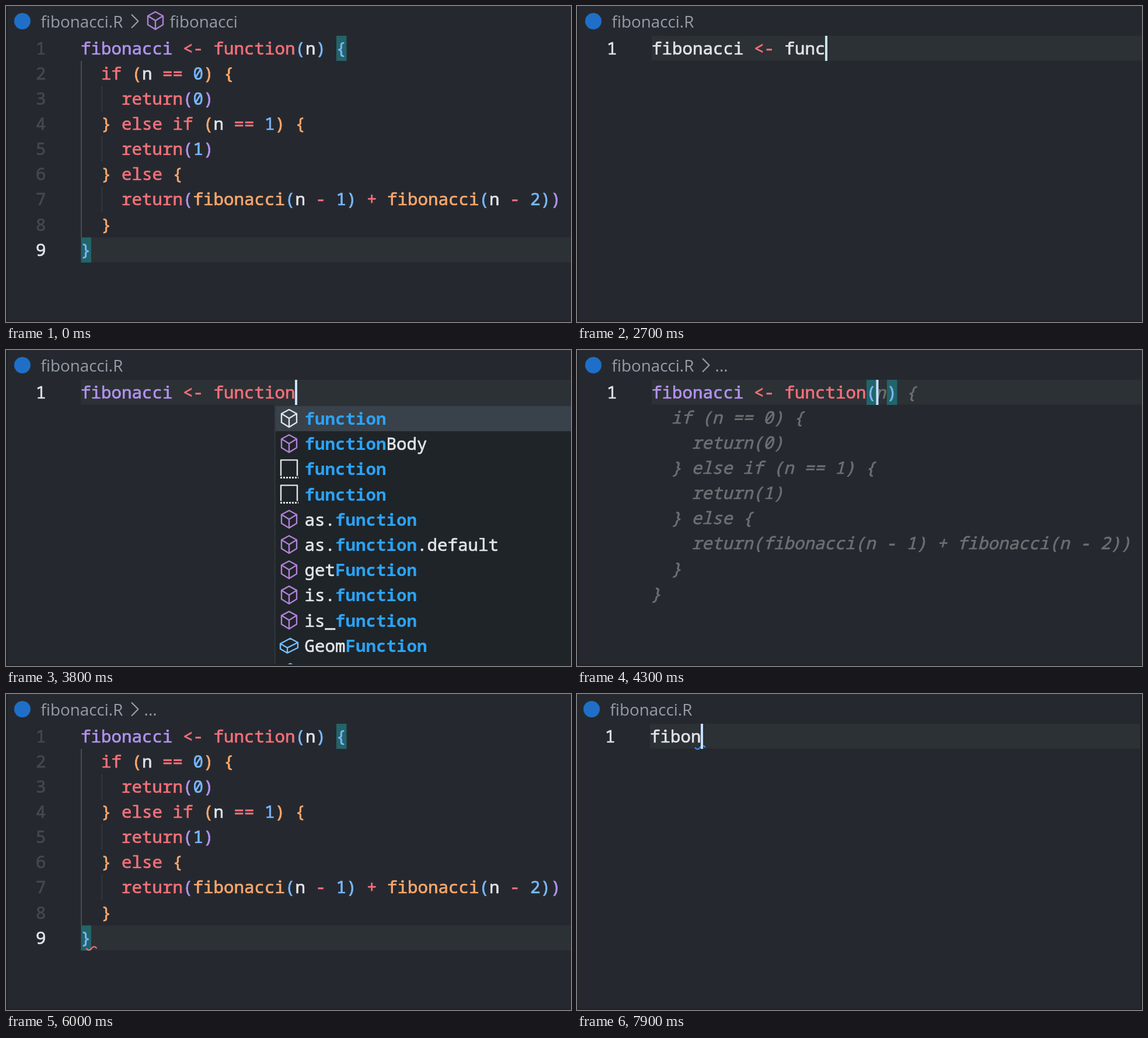
An HTML page that plays this animation: 968x541 px, repeating every 8000 ms.

```html
<!DOCTYPE html>
<html lang="en">
<head>
<meta charset="utf-8">
<title>Typing a function</title>
<style>
  html, body { margin: 0; width: 100%; height: 100%; overflow: hidden; background: #25292f; }
  svg { display: block; width: 100%; height: 100%; }
  text { fill: currentColor; }
  .code { font: 29.17px "Noto Sans Mono", "DejaVu Sans Mono", monospace; font-variant-ligatures: none;
    stroke: currentColor; stroke-width: .7px; }
  .bold { font-weight: 700; stroke: none; }
  .ghost { font-style: italic; transform: translateX(-1.5px); }
  .crumb { font: 27.8px "Open Sans", "Noto Sans", sans-serif; }
</style>
</head>
<body>
<svg id="stage" viewBox="0 0 968 541"></svg>
<script>
const LOOP = 8000, LEFT = 128, TOP = 51, CHAR = 17.5, ROW = 43.15;

const color = {
  back: '#25292f', edge: '#1d2125', line: '#2c3135', text: '#e1e4e8', dim: '#42494f',
  crumb: '#959da5', ghost: '#6c6f72', red: '#f4707a', blue: '#79b8ff', orange: '#fba86e',
  purple: '#b392f0', match: '#23646a', cursor: '#c8e1ff', cube: '#b180d7', field: '#75beff',
  popup: '#1f2428', picked: '#39414a', found: '#2ba3f7', logo: '#1f6fc8'
};
const bracketColors = [color.blue, color.orange, color.purple];

const program = [
  'fibonacci <- function(n) {',
  '  if (n == 0) {',
  '    return(0)',
  '  } else if (n == 1) {',
  '    return(1)',
  '  } else {',
  '    return(fibonacci(n - 1) + fibonacci(n - 2))',
  '  }',
  '}'
];
const head = 'fibonacci <- function';

// [start in ms, characters typed]
const typing = [
  [100, 0], [600, 1], [700, 2], [800, 3], [900, 4], [1000, 5], [1100, 6], [1200, 7], [1300, 8],
  [1500, 9], [1700, 10], [1800, 11], [1900, 12], [2100, 13], [2300, 14], [2400, 15], [2500, 16],
  [2600, 17], [2900, 18], [3000, 19], [3600, 20], [3700, 21], [7600, 1], [7700, 2], [7800, 4], [7900, 5]
];

const suggestions = [
  ['cube', 'function'], ['cube', 'functionBody'], ['snippet', 'function'], ['snippet', 'function'],
  ['cube', 'as.function'], ['cube', 'as.function.default'], ['cube', 'getFunction'],
  ['cube', 'is.function'], ['cube', 'is_function'], ['field', 'GeomFunction'], ['field', 'StatFunction']
];

const colX = col => LEFT + col * CHAR;
const rowY = row => TOP + row * ROW;
const escapeText = s => s.replace(/&/g, '&amp;').replace(/</g, '&lt;');
const rect = (x, y, w, h, fill) => `<rect x="${x}" y="${y}" width="${w}" height="${h}" fill="${fill}"/>`;
const label = (x, y, s, paint, style = 'code') =>
  `<text x="${x}" y="${y}" color="${paint}" class="${style}">${escapeText(s)}</text>`;
const stroke = (d, paint, width = 2.4, extra = '') =>
  `<path d="${d}" fill="none" stroke="${paint}" stroke-width="${width}" stroke-linejoin="round" ${extra}/>`;

const code = (col, row, s, paint, style) => label(colX(col), rowY(row) + 31.5, s, paint, style);
const cursor = (col, row) => rect(colX(col) - .5, rowY(row), 4, 43, color.cursor);
const bracketBox = (col, row) => rect(colX(col) + .5, rowY(row), 17.5, 43, color.match);
const currentLine = row => rect(LEFT, rowY(row), 840, 42.5, color.line);
const lineNumber = (row, active) => label(50.9, rowY(row) + 31.5, String(row + 1), active ? color.text : color.dim);
const squiggle = (x, y, paint) => stroke(`M${x} ${y}q4.5 6 9 0t9 0`, paint, 2.2);

function icon(kind, x, y, paint) {
  const shapes = {
    cube: 'M0-15L13-8V7L0 15L-13 7V-8ZM-13-8L0 0L13-8M0 0V15',
    field: 'M2-12L15-5V4L-3 13L-15 6V-3ZM-15-3L-3 4L15-5M-3 4V13',
    snippet: 'M-14 12V-15H14V12'
  };
  const dots = kind === 'snippet' ? stroke('M-15 15H16', paint, 3, 'stroke-dasharray="3 2"') : '';
  return `<g transform="translate(${x} ${y})">${stroke(shapes[kind], paint)}${dots}</g>`;
}

function highlight(lines) {
  let depth = 0, out = '';
  lines.forEach((line, row) => {
    for (const m of line.matchAll(/[a-z]+|\d|==|<-|[-+<]|[(){}]/g)) {
      const token = m[0];
      let paint = color.text;
      if (/^(function|if|else|return|==|<-|[-+<])$/.test(token)) paint = color.red;
      else if (/\d/.test(token)) paint = color.blue;
      else if (/[({]/.test(token)) paint = bracketColors[depth++ % 3];
      else if (/[)}]/.test(token)) paint = bracketColors[--depth % 3];
      else if (token === 'fibonacci') {
        if (line[m.index + token.length] === '(') paint = color.orange;
        else if (line.includes('function')) paint = color.purple;
      }
      out += code(m.index, row, token, paint);
    }
  });
  return out;
}

function ghostText() {
  const ghost = (col, row, s) => code(col, row, s, color.ghost, 'code ghost');
  let out = ghost(22, 0, 'n') + ghost(25, 0, '{');
  program.slice(1).forEach((line, i) => {
    for (const m of line.matchAll(/\S+/g)) out += ghost(m.index, i + 1, m[0]);
  });
  return out;
}

function popup(word) {
  let out = rect(460, 94, 508, 444, '#343a40') + rect(461.5, 95.5, 507, 443, color.popup)
    + rect(461.5, 96, 507, 43, color.picked);
  suggestions.forEach(([kind, name], i) => {
    const y = 117 + i * 43.2, at = name.toLowerCase().indexOf(word), end = at + word.length;
    const paint = i === 0 || kind === 'snippet' ? color.text : kind === 'field' ? color.field : color.cube;
    const part = (from, to, fill, style) =>
      from < to ? label(511.5 + from * CHAR, y + 11, name.slice(from, to), fill, style) : '';
    out += icon(kind, 485, y, paint) + part(0, at, color.text)
      + part(at, end, color.found, 'code bold') + part(end, name.length, color.text);
  });
  return `<g clip-path="url(#stageClip)">${out}</g>`;
}

function breadcrumb(trail) {
  let out = `<circle cx="28" cy="26" r="14" fill="${color.logo}"/>` + label(59.5, 36.5, 'fibonacci.R', color.crumb, 'crumb');
  if (trail) out += stroke('M215 14.5L226.5 26L215 37.5', color.crumb, 2.2);
  if (trail === 'dots') out += label(236.5, 36.5, '...', color.crumb, 'crumb');
  if (trail === 'symbol') out += icon('cube', 256, 25, color.cube) + label(280.5, 36.5, 'fibonacci', color.crumb, 'crumb');
  return out;
}

function finished(t) {
  const settled = t < 100 || t >= 6300;
  const cursorOn = t >= 5100 && Math.floor((t - 5100) / 500) % 2 === 0;
  let out = breadcrumb(settled ? 'symbol' : 'dots') + currentLine(8);
  program.forEach((_, row) => out += lineNumber(row, row === 8));
  out += rect(128, rowY(1), 2, ROW * 7, '#444d56');
  for (const row of [2, 4, 6]) out += rect(163.5, rowY(row), 1.5, ROW, '#363d44');
  out += bracketBox(25, 0) + bracketBox(0, 8) + highlight(program);
  if (!settled && t >= 5400) out += squiggle(137.5, 435.5, color.red);
  return out + (cursorOn ? cursor(1, 8) : '');
}

function offered(t) {
  const cursorOn = t < 4400 || t >= 4900, ghost = t >= 4100;
  const closeCol = ghost ? 23 : 22;
  return breadcrumb(t >= 4000 ? 'dots' : '') + currentLine(0) + lineNumber(0, true)
    + bracketBox(21, 0) + bracketBox(closeCol, 0) + highlight([head + '('])
    + code(closeCol, 0, ')', color.blue) + (ghost ? ghostText() : '')
    + (cursorOn ? cursor(22, 0) : '');
}

function typed(t) {
  const count = typing.filter(step => step[0] <= t).pop()[1];
  return breadcrumb('') + currentLine(0) + lineNumber(0, true) + highlight([head.slice(0, count)])
    + (t >= 7900 ? squiggle(205, 91.5, '#3b8eea') : '') + cursor(count, 0)
    + (t >= 3100 && t < 3900 ? popup(head.slice(13, count)) : '');
}

function scene(t) {
  const restarted = t >= 7600;
  const view = t < 100 || (t >= 5100 && !restarted) ? finished : t >= 3900 && !restarted ? offered : typed;
  return '<clipPath id="stageClip"><rect width="968" height="538"/></clipPath>'
    + rect(0, 0, 968, 541, color.back)
    + `<g transform="translate(${restarted ? -3 : 0} 0)">`
    + rect(0, 0, 2.5, 541, color.edge) + view(t) + rect(968, 0, 3, 541, color.edge) + '</g>'
    + rect(0, 539, 968, 2, color.edge);
}

const stage = document.getElementById('stage');
const start = performance.now();
let shown = '';
function frame() {
  const next = scene((performance.now() - start) % LOOP);
  if (next !== shown) stage.innerHTML = shown = next;
  requestAnimationFrame(frame);
}
frame();
</script>
</body>
</html>
```
